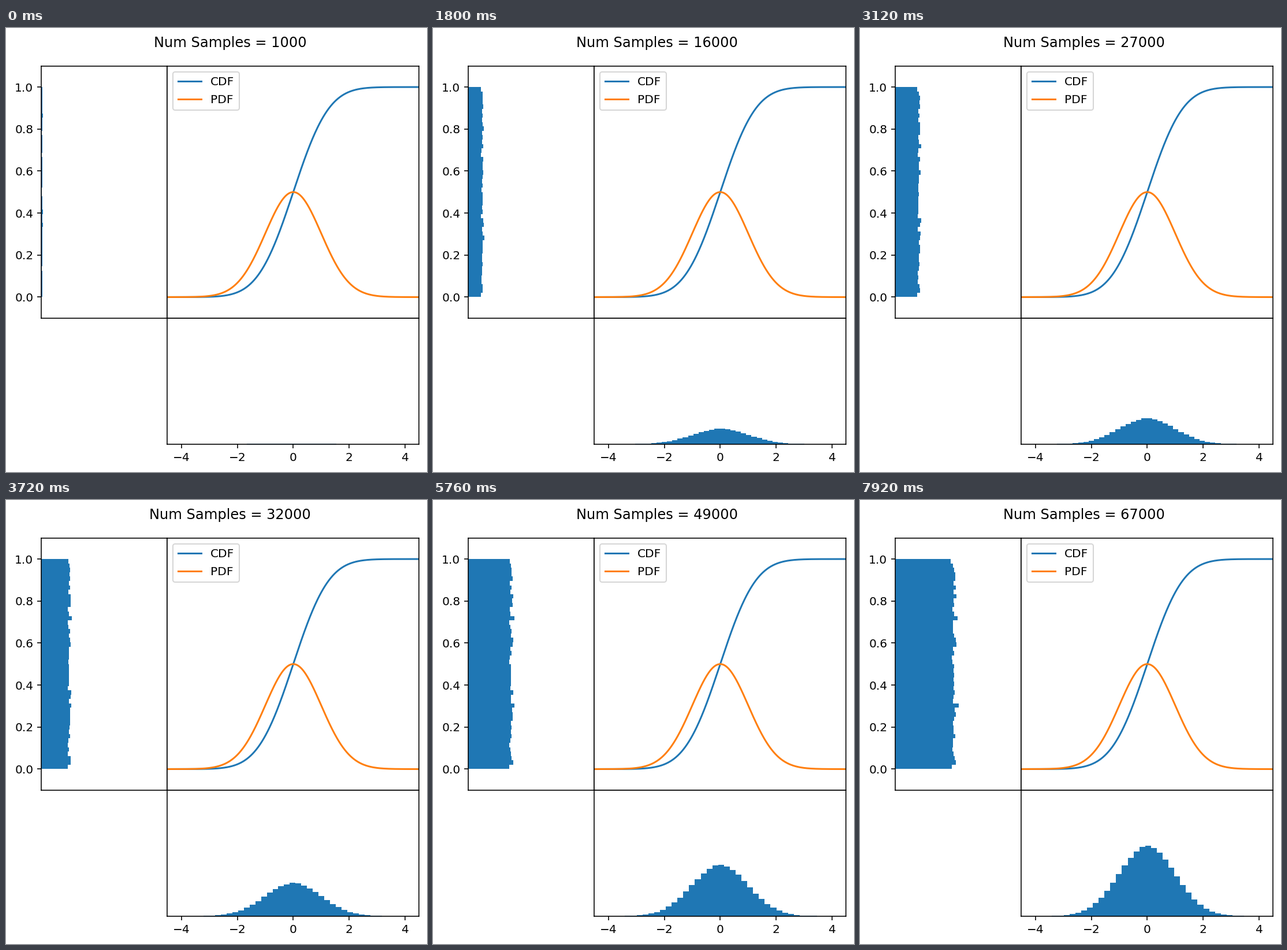
A matplotlib script that plays this animation: 729 px wide and 768 px high, repeating every 8 s.

```python
import math

import matplotlib.pyplot as plt
import numpy as np
from matplotlib.animation import FuncAnimation

W, H, DPI = 729, 768, 145
BINS = 48
STEPS = 67
BATCH = 1000       # samples added per step
Y_MAX = 3000       # count range of the uniform histogram
X_MAX = 10000      # count range of the normal histogram
UNIT = 436 / 9     # pixels per unit on the x axis
MID_X = 497.4      # pixel of x = 0

plt.rcParams.update({"font.family": "DejaVu Sans", "font.size": 10})
rng = np.random.default_rng(7)

# The normal histogram rebins when an outlier widens its range:
# (first step, bin width in px, a bin edge in px)
PHASES = [(1, 6.2, 490.9), (5, 7.4, 488.0), (15, 9.15, 478.2),
          (29, 9.95, 481.4), (46, 10.08, 473.6)]

uniform = np.cumsum(rng.multinomial(BATCH, np.full(BINS, 1 / BINS), STEPS), axis=0)
grain = rng.normal(0, 0.4, BINS)


def cdf(x):
    return np.array([0.5 * (1 + math.erf(v / math.sqrt(2))) for v in x])


def normal_counts(n):
    """Expected counts plus sampling noise, and the bin edges."""
    _, width, edge = [p for p in PHASES if p[0] <= n][-1]
    k = np.arange(BINS + 1) - BINS // 2
    edges = (edge + k * width - MID_X) / UNIT
    counts = BATCH * n * np.diff(cdf(edges))
    return np.maximum(counts + grain * np.sqrt(counts), 0), edges


def add_axes(x, y, w, h, xlim, ylim):
    """Axes from a box in pixels, y measured from the top."""
    ax = fig.add_axes([x / W, 1 - (y + h) / H, w / W, h / H])
    ax.set(xlim=xlim, ylim=ylim, xticks=[], yticks=[])
    return ax


fig = plt.figure(figsize=(W / DPI, H / DPI), dpi=DPI, facecolor="white")
left = add_axes(61.4, 65.8, 218, 436, (0, Y_MAX), (-0.1, 1.1))
main = add_axes(279.4, 65.8, 436, 436, (-4.5, 4.5), (-0.1, 1.1))
low = add_axes(279.4, 501.8, 436, 218, (-4.5, 4.5), (0, X_MAX))
left.set_yticks(np.arange(6) / 5)
low.set_xticks(range(-4, 5, 2))

xs = np.linspace(-4.5, 4.5, 400)
main.plot(xs, cdf(xs), color="C0", label="CDF")
main.plot(xs, 0.5 * np.exp(-xs ** 2 / 2), color="C1", label="PDF")
main.legend(loc="upper left", labelspacing=0.57, borderpad=0.42)

title = fig.text(388 / W, 1 - 33.5 / H, "", size=12, ha="center", va="baseline")
side = left.stairs(uniform[0], np.linspace(0, 1, BINS + 1),
                   orientation="horizontal", fill=True, color="C0", lw=0)
bell = low.stairs(*normal_counts(1), fill=True, color="C0", lw=0)


def draw(i):
    n = 1 + i // 3
    title.set_text(f"Num Samples = {BATCH * n}")
    side.set_data(uniform[n - 1])
    bell.set_data(*normal_counts(n))
    return title, side, bell


anim = FuncAnimation(fig, draw, frames=200, interval=40, repeat=True,
                     repeat_delay=0, blit=False)
plt.show()
```
